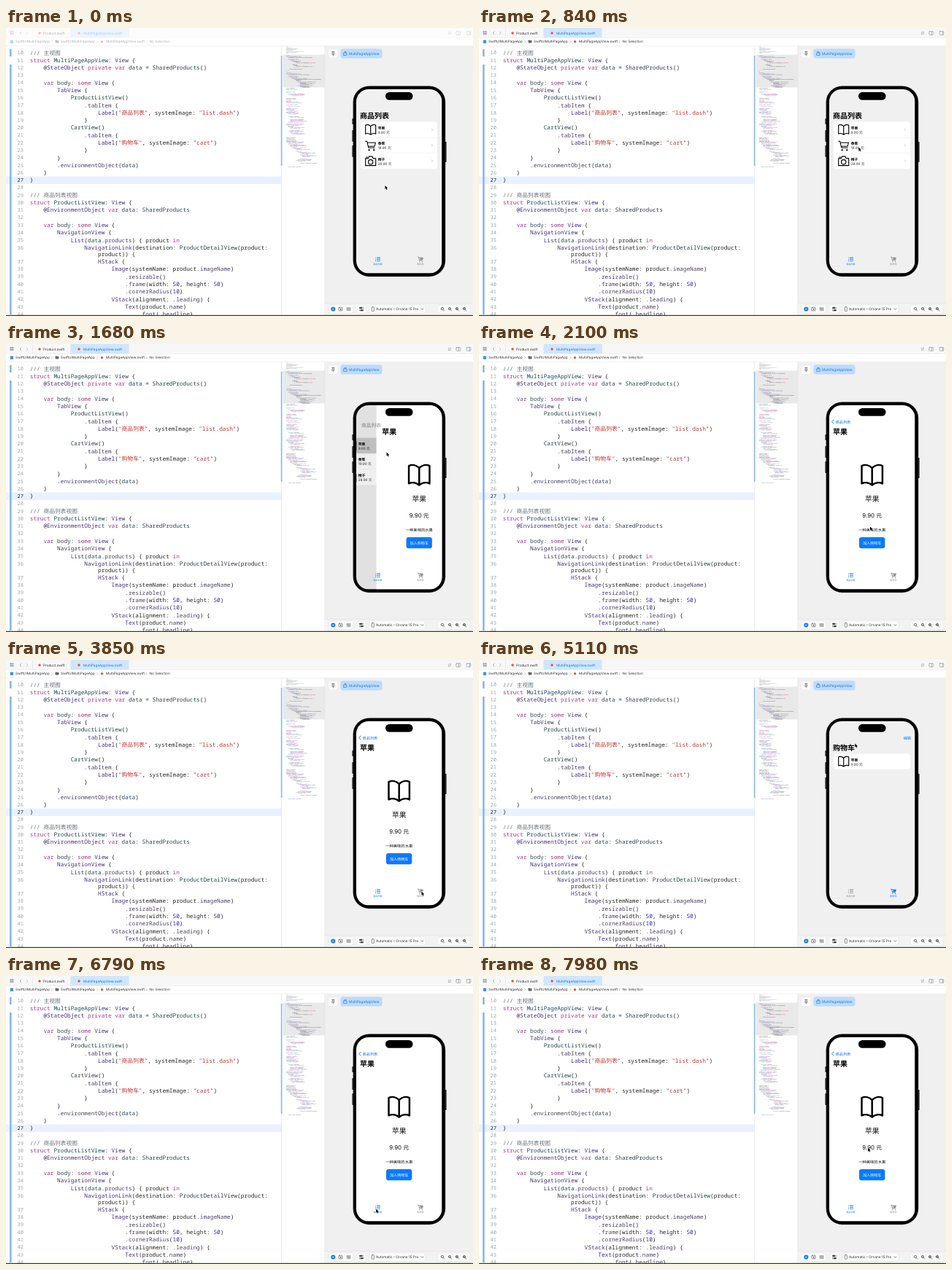
Write an HTML page with a canvas that moves like this. It is 640 px wide and 395 px high and loops after 8000 ms.

```html
<!DOCTYPE html>
<html lang="zh-CN">
<head>
<meta charset="utf-8">
<style>
html, body { margin: 0; width: 100%; height: 100%; overflow: hidden; background: #fff; }
canvas { display: block; width: 640px; height: 395px; }
</style>
</head>
<body>
<canvas id="stage"></canvas>
<script>
const W = 640, H = 395, LOOP = 8000;
const UI = 'Inter, "Noto Sans CJK SC", "Noto Sans CJK", sans-serif';
const MONO = '"Noto Sans Mono", "Noto Sans CJK SC", "Noto Sans CJK", monospace';
const BLUE = '#0a7aff', GROUPED = '#f0f0f1', GRAY = '#8e8e93', CHANGED = '#8ab5ec', ORANGE = '#f05138';
const SCREEN = { x: 480, y: 84, w: 117.5, h: 252.5 };
const dpr = window.devicePixelRatio || 1;

let c;
function setup(canvas) {
  canvas.width = W * dpr;
  canvas.height = H * dpr;
  const ctx = canvas.getContext('2d');
  ctx.scale(dpr, dpr);
  ctx.textRendering = 'geometricPrecision';
  ctx.lineCap = ctx.lineJoin = 'round';
  return ctx;
}

// ---- helpers ----
const clamp = v => Math.max(0, Math.min(1, v));
const mix = (a, b, k) => a + (b - a) * k;
const smooth = k => k * k * (3 - 2 * k);

function rect(x, y, w, h, color, r = 0) {
  c.fillStyle = color;
  c.beginPath();
  c.roundRect(x, y, w, h, r);
  c.fill();
}
function frame(x, y, w, h, color, r = 0, lw = 0.6) {
  c.strokeStyle = color;
  c.lineWidth = lw;
  c.beginPath();
  c.roundRect(x, y, w, h, r);
  c.stroke();
}
function dot(x, y, r, color) {
  c.fillStyle = color;
  c.beginPath();
  c.arc(x, y, r, 0, 7);
  c.fill();
}
function path(d, x, y, s, color, lw, fill) {
  const p = new Path2D(d);
  c.save();
  c.translate(x, y);
  c.scale(s, s);
  if (fill) { c.fillStyle = fill; c.fill(p); }
  if (lw) { c.strokeStyle = color; c.lineWidth = lw; c.stroke(p); }
  c.restore();
}
function text(s, x, y, size, color, weight = 400, align = 'left', font = UI) {
  c.font = `${weight} ${size}px ${font}`;
  c.textAlign = align;
  c.fillStyle = color;
  c.fillText(s, x, y + size * 0.36);
}
function faded(alpha, draw) {
  if (alpha <= 0) return;
  c.save();
  c.globalAlpha *= Math.min(1, alpha);
  draw();
  c.restore();
}

// ---- icons, centred on 0,0 ----
const BOOK = 'M0-7C-3-10-7-10.5-10-9V8C-7 6.5-3 7 0 9.5C3 7 7 6.5 10 8V-9C7-10.5 3-10 0-7V9';
const CART = 'M-11-9H-8L-4.5 5H8.5M-7-6H10.5L8.5 2H-5';
const WHEELS = 'M-3.2 8.6a1.4 1.4 0 1 0 .1 0M7 8.6a1.4 1.4 0 1 0 .1 0';
const CAMERA = 'M-10-5H-5L-3-9H3L5-5H10V9H-10ZM-4.5 2a4.5 4.5 0 1 0 9 0a4.5 4.5 0 1 0-9 0M-8-7.5H-6.5';
const GLASS = 'M-2-.5a1.7 1.7 0 1 0 3.4 0a1.7 1.7 0 1 0-3.4 0M1 1L2.5 2.5';
const ARROW = 'M0 0V5.2L1.2 4.1L2 6L3 5.6L2.2 3.8H3.8Z';

// ---- code ----
const CODE = `/// 主视图
struct MultiPageAppView: View {
    @StateObject private var data = SharedProducts()

    var body: some View {
        TabView {
            ProductListView()
                .tabItem {
                    Label("商品列表", systemImage: "list.dash")
                }
            CartView()
                .tabItem {
                    Label("购物车", systemImage: "cart")
                }
        }
        .environmentObject(data)
    }
}

/// 商品列表视图
struct ProductListView: View {
    @EnvironmentObject var data: SharedProducts

    var body: some View {
        NavigationView {
            List(data.products) { product in
                NavigationLink(destination: ProductDetailView(product:
                    product)) {
                    HStack {
                        Image(systemName: product.imageName)
                            .resizable()
                            .frame(width: 50, height: 50)
                            .cornerRadius(10)
                        VStack(alignment: .leading) {
                            Text(product.name)
                                .font(.headline)`.split('\n');
const WRAPPED = 27, PITCH = 10.28, WRAP_TRIM = 1.3;
const TOKEN = /\/\/\/.*|"[^"]*"|@\w+|\.?\w+|\s+|[^\w\s"@.\/]+|./g;

function tint(tok, prev) {
  if (tok.startsWith('///')) return '#66717c';
  if (tok[0] === '"') return '#c5302b';
  if (/^(struct|private|var|some|in)$/.test(tok)) return '#a2388f';
  if (prev === 'struct') return '#20455f';
  if (/^(SharedProducts|CartView|Product\w+)$/.test(tok)) return '#2b4448';
  if (/^\d/.test(tok)) return '#2f22b8';
  if (/^(@|[A-Z])/.test(tok)) return '#45307f';
  if (/^\.\w/.test(tok)) return '#4b3f66';
  if (tok === 'body' || tok === 'data') return '#2d4656';
  return '#262626';
}
function tokens(line) {
  let prev = '';
  return (line.match(TOKEN) || []).map(s => {
    const color = tint(s, prev);
    if (s.trim()) prev = s;
    return { s, color };
  });
}

function drawCode() {
  rect(0, 203.6, 377, 10.3, '#e8f2ff');
  rect(5, 29, 2.6, 10, CHANGED);
  rect(5, 50, 2.6, 343, CHANGED);
  let num = 10;
  CODE.forEach((line, i) => {
    const y = 33.8 + i * PITCH - (i >= WRAPPED ? WRAP_TRIM : 0);
    if (i !== WRAPPED) {
      text(num, 24, y, 7, num === 27 ? '#222' : '#a3a3a8', 400, 'right', MONO);
      num++;
    }
    let x = 32.8;
    for (const { s, color } of tokens(line)) {
      text(s, x, y, 7.78, color, 500, 'left', MONO);
      x += c.measureText(s).width;
    }
  });
}

function drawMinimap() {
  rect(377, 24, 0.6, 370, '#dedede');
  rect(379.5, 36.5, 57.5, 45, '#e9e9ea');
  rect(376.8, 38, 1.6, 151, CHANGED);
  let seed = 11;
  const rnd = () => (seed = seed * 16807 % 2147483647) / 2147483647;
  const bar = (x, y, w, color) => faded(0.38, () => rect(x, y, w, 0.75, color));
  for (let i = 0; i < 8; i++) bar(384, 25.5 + i * 1.25, i % 7 ? 8 + rnd() * 18 : 3, '#7c8790');
  CODE.forEach((line, i) => {
    let x = 384;
    for (const { s, color } of tokens(line)) {
      const w = s.length * 0.68;
      if (s.trim()) bar(x, 37.5 + i * 1.25, w, color);
      x += w;
    }
  });
  const hues = ['#45307f', '#6c50a0', '#40707c', '#444', '#a2388f'];
  let depth = 0;
  for (let y = 82.5; y < 191; y += 1.25) {
    const gap = [84, 93, 118, 146, 185].some(g => y > g && y < g + 3);
    if (gap) { depth = 0; continue; }
    depth = Math.max(0, Math.min(8, depth + Math.round(rnd() * 2.5 - 1)));
    if (rnd() < 0.2) continue;
    let x = 384 + depth * 2.7;
    for (let n = 1 + rnd() * 2; n > 0; n--) {
      const w = 2 + rnd() * 7;
      if (x + w < 436) bar(x, y, w, hues[Math.floor(rnd() * 5)]);
      x += w + 0.8;
    }
  }
}

// ---- window chrome ----
function drawToolbar() {
  rect(0, 0, W, 13, '#f7f7f7');
  rect(89, 0, 79, 13, '#d0e6fe');
  rect(0, 13, W, 0.5, '#e4e4e4');
  rect(0, 24, W, 0.5, '#e8e8e8');
  for (const x of [36, 88.5, 168]) rect(x, 1, 0.5, 12, '#dcdcdc');
  for (let i = 0; i < 4; i++) frame(5.9 + (i % 2) * 2.7, 4.6 + (i >> 1) * 2.7, 1.6, 1.6, '#666', 0.3, 0.5);
  path('M1-2L-1 0L1 2', 20, 7, 1, '#777', 0.6);
  path('M-1-2L1 0L-1 2', 29, 7, 1, '#aaa', 0.6);
  dot(46, 7, 1.7, ORANGE);
  text('Product.swift', 51, 7, 4.7, '#333');
  dot(100, 7, 1.7, ORANGE);
  text('MultiPageAppView.swift', 106, 7, 4.7, '#1674dc');
  path('M-2-1H2L1-2M2 1H-2L-1 2', 608, 7, 1, '#777', 0.5);
  frame(616.8, 4.6, 6, 4.8, '#777', 0.8, 0.5);
  rect(620, 4.6, 0.5, 4.8, '#777');
  frame(631.2, 4.6, 5.6, 4.8, '#777', 0.8, 0.5);
  rect(635, 4.6, 0.5, 4.8, '#777');
}

function drawBreadcrumb() {
  const gt = x => path('M-.7-1.6L.7 0L-.7 1.6', x, 18.7, 1, '#888', 0.5);
  rect(5.7, 16.6, 4.3, 4.3, '#3c8ff0', 1);
  text('SwiftUIMultiPageApp', 13, 18.7, 4.7, '#333');
  gt(63);
  rect(67.6, 16.4, 2.2, 1.5, '#666', 0.4);
  rect(67.6, 17, 4.8, 3.6, '#666', 0.6);
  text('SwiftUIMultiPageApp', 75, 18.7, 4.7, '#333');
  gt(125.5);
  dot(131.5, 18.7, 1.7, ORANGE);
  text('MultiPageAppView.swift', 137, 18.7, 4.7, '#333');
  gt(192.5);
  text('No Selection', 196.5, 18.7, 4.7, '#333');
}

function drawPreviewPane() {
  rect(437, 24.5, 203, 370, '#f0f0f0');
  rect(436.6, 24, 0.5, 370, '#dedede');

  rect(441.5, 28.5, 13.5, 13, '#fafafa', 3);
  frame(441.5, 28.5, 13.5, 13, '#e2e2e2', 3, 0.5);
  path('M-1.4-2.4H1.4M-1-2.4V0L-2 1H2L1 0V-2.4M0 1V3', 448.3, 35, 1, '#444', 0.6);
  rect(458.5, 28.5, 57, 13, '#bcdbfd', 3);
  path('M-2-1H2V2.5H-2ZM-1-1V-2.5H1V-1', 465, 35, 1, '#1674dc', 0.6);
  text('MultiPageAppView', 470, 35, 4.7, '#1674dc');

  rect(437, 377.5, 203, 16.5, '#f3f3f3');
  rect(437, 377.5, 203, 0.5, '#e0e0e0');
  for (const [x, w] of [[442, 34], [480, 14], [497.5, 77.5], [591, 45]]) {
    rect(x, 379.5, w, 12, '#fafafa', 3);
    frame(x, 379.5, w, 12, '#dedede', 3, 0.5);
  }
  dot(448.3, 385.5, 3, BLUE);
  path('M-.8-1.3L1.4 0L-.8 1.3Z', 448.3, 385.5, 1, '', 0, '#fff');
  frame(456, 383.2, 5, 4.6, '#444', 0.8);
  path('M-1-1L1.4 0L0 1.4Z', 458.5, 385.5, 1, '', 0, '#444');
  for (let i = 0; i < 9; i++) rect(467 + (i % 3) * 1.9, 383.3 + Math.floor(i / 3) * 1.7, 1.3, 1.1, '#555');
  rect(484, 382.8, 6, 2.2, '#444', 1.1);
  rect(484, 386, 6, 2.2, '#444', 1.1);
  dot(488.8, 383.9, 0.8, '#fff');
  dot(485.2, 387.1, 0.8, '#fff');
  frame(501.4, 382.6, 3, 5.8, '#444', 0.7);
  text('Automatic – Orvane 15 Pro', 507, 385.5, 4.7, '#333');
  path('M-1.3-.6L0 .7L1.3-.6', 570.5, 385.5, 1, '#444', 0.7);
  ['M-1.3-.5H.7', 'M-1-.5H.4', 'M-1-.5H.4M-.3-1.2V.2', 'M-1.2-.5H.6M-.3-1.2V.2'].forEach((mark, i) => {
    path(GLASS + (i ? mark : ''), 598.3 + i * 10, 385.5, 1, '#444', 0.7);
  });
}

function drawPhone() {
  for (const [x, y, h] of [[474.4, 124, 8], [474.4, 140, 16], [474.4, 161, 16], [601.6, 156, 28]]) {
    rect(x, y, 2, h, '#222', 0.8);
  }
  rect(475.6, 79.5, 126.6, 261.5, '#1c1c1e', 22);
  rect(476.4, 80.3, 125, 259.9, '#000', 21.3);
}

function drawStatic() {
  rect(0, 0, W, H, '#fff');
  drawCode();
  drawMinimap();
  drawToolbar();
  drawBreadcrumb();
  drawPreviewPane();
  drawPhone();
  rect(0, 393.8, W, 1.2, '#0c5a14');
}

// ---- app screens ----
function row(icon, name, price, y) {
  const size = icon === CART ? 0.64 : 0.7;
  path(icon, 499.7, y, size, '#000', 1.65);
  if (icon === CART) path(WHEELS, 499.7, y, size, '#000', 0.8, '#000');
  text(name, 509.7, y - 2.4, 4.8, '#000', 700);
  text(price, 509.7, y + 3.6, 4.7, '#222');
}

function listScreen(shift, dim, pressed) {
  rect(SCREEN.x, SCREEN.y, SCREEN.w, SCREEN.h, GROUPED);
  c.save();
  c.translate(shift, 0);
  rect(486, 128.5, 105, 64.8, '#fff', 4);
  if (pressed) rect(486, 128.5, 105, 21.6, '#cbcbcc', [4, 4, 0, 0]);
  const goods = [[BOOK, '苹果', '9.90 元'], [CART, '香蕉', '19.90 元'], [CAMERA, '橙子', '29.90 元']];
  goods.forEach(([icon, name, price], i) => {
    const y = 139.6 + i * 21.4;
    row(icon, name, price, y);
    if (!pressed || i) path('M-.7-1.4L.7 0L-.7 1.4', 584, y, 1, '#b8b8bc', 0.7);
    if (i) rect(509.7, y - 10.7, 81.3, 0.3, '#dcdce0');
  });
  c.restore();
  faded(dim, () => rect(SCREEN.x, SCREEN.y, SCREEN.w, SCREEN.h, '#000'));
}

function detailScreen(shift, press) {
  c.save();
  c.translate(shift, 0);
  rect(SCREEN.x, SCREEN.y, SCREEN.w, SCREEN.h, '#fff');
  path(BOOK, 538.7, 180, 1.42, '#000', 1.75);
  text('苹果', 538.7, 212.5, 9.8, '#111', 400, 'center');
  text('9.90 元', 538.7, 235.3, 7.9, '#111', 400, 'center');
  text('一种美味的水果', 538.7, 254.6, 5.3, '#111', 400, 'center');
  faded(1 - press * 0.5, () => {
    rect(521, 265, 35.3, 15.3, BLUE, 3);
    text('加入购物车', 538.7, 272.7, 5.1, '#fff', 400, 'center');
  });
  c.restore();
}

function productNav(p) {
  const q = Math.pow(p, 1.5);
  faded(1 - Math.pow(p, 1.3), () => {
    text('商品列表', mix(485, 488, q), mix(120.7, 106.7, q), mix(10, 5.2, q), '#000', 700);
  });
  faded((p - 0.8) * 5, () => {
    path('M1.4-2.6L-1.2 0L1.4 2.6', 484.8, 106.7, 1, BLUE, 0.9);
    text('商品列表', 488.5, 106.7, 5.2, BLUE);
  });
  faded(p * 2, () => text('苹果', 485 + (1 - p) * 129, 120.7, 10, '#000', p < 0.6 ? 400 : 700));
}

function cartScreen() {
  rect(SCREEN.x, SCREEN.y, SCREEN.w, SCREEN.h, GROUPED);
  text('编辑', 592, 107, 5.2, BLUE, 400, 'right');
  text('购物车', 485, 120.7, 10, '#000', 700);
  rect(486, 128.5, 105, 21.6, '#fff', 4);
  row(BOOK, '苹果', '9.90 元', 139.4);
}

function tabBar(onCart) {
  const a = onCart ? GRAY : BLUE, b = onCart ? BLUE : GRAY;
  for (let i = 0; i < 3; i++) {
    dot(506.5, 315 + i * 2.2, 0.55, a);
    rect(508, 314.6 + i * 2.2, 5, 0.85, a);
  }
  text('商品列表', 509.4, 324, 3.1, a, 500, 'center');
  path(CART, 568, 317, 0.34, b, 1.8, b);
  path(WHEELS, 568, 317, 0.34, b, 1, b);
  text('购物车', 567.8, 324, 3.2, b, 500, 'center');
}

// ---- timeline ----
const PUSH = 1460, ADD = 2480, TO_CART = 4130, TO_LIST = 6580;
const POINTER = [
  [350, 519.5, 216], [1120, 520.5, 141], [1600, 520.5, 141], [2100, 536, 250.5],
  [2400, 537, 270.5], [2940, 537, 270.5], [3850, 569.5, 317.5], [4690, 569.5, 317.5],
  [5110, 515.3, 114.5], [5530, 515.3, 114.5], [5950, 534, 141], [6100, 534, 141],
  [6500, 507.2, 319.5], [7210, 507.2, 319.5], [7800, 533, 235.5]
];

function pointerAt(t) {
  const i = POINTER.findIndex(k => k[0] > t);
  if (i < 0) return POINTER[POINTER.length - 1].slice(1);
  if (i === 0) return POINTER[0].slice(1);
  const [t0, x0, y0] = POINTER[i - 1], [t1, x1, y1] = POINTER[i];
  const k = smooth((t - t0) / (t1 - t0));
  return [mix(x0, x1, k), mix(y0, y1, k)];
}

function drawScreen(t) {
  const onCart = t >= TO_CART && t < TO_LIST;
  const p = 1 - Math.pow(1 - clamp((t - PUSH) / 500), 2.5);
  const press = smooth(clamp(1 - Math.abs(t - ADD) / 140));
  c.save();
  c.beginPath();
  c.roundRect(SCREEN.x, SCREEN.y, SCREEN.w, SCREEN.h, 17);
  c.clip();
  if (onCart) {
    cartScreen();
  } else {
    if (p < 1) listScreen(-0.3 * SCREEN.w * p, p * 0.08, t > PUSH - 70);
    if (p > 0) detailScreen((1 - p) * SCREEN.w, press);
    productNav(p);
  }
  tabBar(onCart);
  c.restore();
  rect(520, 88, 37.5, 10.8, '#000', 5.4);
}

const stage = setup(document.getElementById('stage'));
const backdrop = document.createElement('canvas');
c = setup(backdrop);
drawStatic();
c = stage;

function render(t) {
  c.drawImage(backdrop, 0, 0, W, H);
  // the window bar is washed out until the window becomes active
  faded(0.62 * (1 - clamp((t - 350) / 280)), () => rect(0, 0, W, 24, '#fff'));
  drawScreen(t);
  const [x, y] = pointerAt(t);
  path(ARROW, x, y, 1, '#fff', 0.8);
  path(ARROW, x, y, 1, '', 0, '#000');
}
let start;
function tick(now) {
  start ??= now;
  render((now - start) % LOOP);
  requestAnimationFrame(tick);
}
requestAnimationFrame(tick);
</script>
</body>
</html>
```
